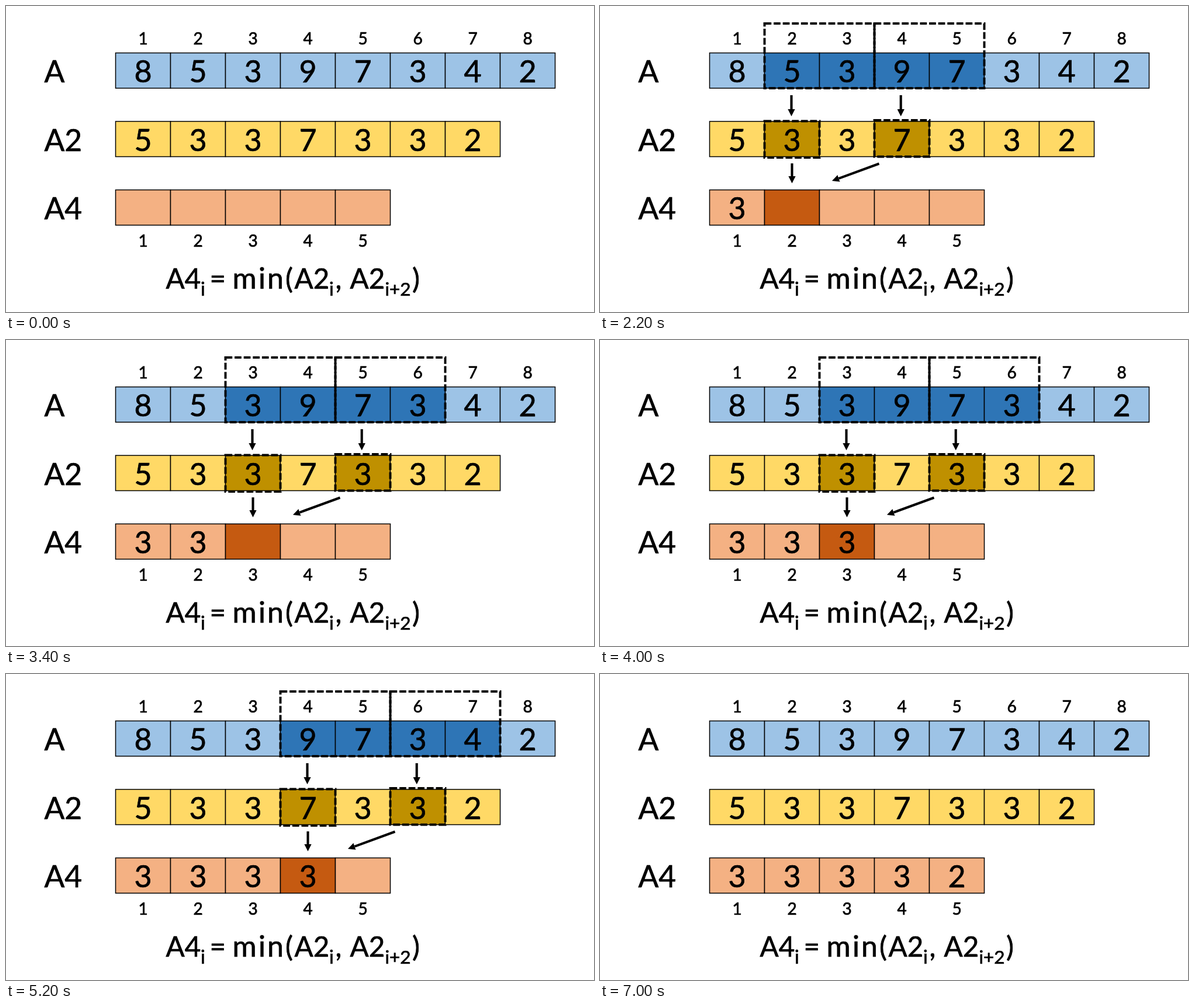
Animation, 1006 px wide and 525 px high, one loop 8 s. Source, as an HTML page:

```html
<!DOCTYPE html>
<html lang="en">
<head>
<meta charset="utf-8">
<title>Sparse table of range minima</title>
<style>
  html, body { margin: 0; width: 100%; height: 100%; overflow: hidden; background: #fff; }
  svg { display: block; width: 1006px; height: 525px; font-family: Lato, "Open Sans", sans-serif; }
  text { stroke: #000; stroke-width: 0.7; }
  .cell { stroke: #000; stroke-width: 1.5; }
  .dash { fill: none; stroke: #000; stroke-width: 3.9; stroke-dasharray: 11.7 3.9; }
  .arrow { stroke: #000; stroke-width: 4.1; marker-end: url(#head); }
</style>
</head>
<body>
<svg viewBox="0 0 1006 525">
  <defs>
    <marker id="head" viewBox="0 0 3 3" refX="0" refY="1.5" markerWidth="3" markerHeight="3" orient="auto">
      <path d="M0 0L3 1.5L0 3z"/>
    </marker>
  </defs>
  <g id="scene"></g>
</svg>
<script>
const LEFT = 187.5, CELL = 94, HEIGHT = 60.5;
const ROWS = [
  { name: 'A', y: 80.5, values: [8, 5, 3, 9, 7, 3, 4, 2], light: '#9dc3e6', dark: '#2e75b6', lit: [0, 1, 2, 3] },
  { name: 'A2', y: 198, values: [5, 3, 3, 7, 3, 3, 2], light: '#ffd966', dark: '#bf9000', lit: [0, 2] },
  { name: 'A4', y: 315.5, values: [3, 3, 3, 3, 2], light: '#f4b183', dark: '#c55a11', lit: [0] }
];
// Text, x, baseline, size
const FORMULA = [
  ['A4', 273.5, 485, 47.5], ['i', 333, 497, 32], ['=', 348.5, 485, 47.5],
  ['m', 387.5, 485, 50], ['i', 432, 485, 50], ['n', 447, 485, 50], ['(', 478, 485, 48.5],
  ['A2', 493.5, 485, 47.5], ['i', 553, 497, 32], [',', 563.5, 485, 47.5],
  ['A2', 588.5, 485, 47.5], ['i+2', 648.5, 497, 31.5], [')', 695, 485, 48.5]
];
const scene = document.getElementById('scene');

const text = (s, x, y, size, anchor = 'start') =>
  `<text x="${x}" y="${y}" font-size="${size}" text-anchor="${anchor}">${s}</text>`;
const rect = (x, y, w, h, attrs) =>
  `<rect x="${x}" y="${y}" width="${w}" height="${h}" ${attrs}/>`;
const arrow = (x1, y1, x2, y2) =>
  `<line class="arrow" x1="${x1}" y1="${y1}" x2="${x2}" y2="${y2}"/>`;
const dashed = (x, y, w, h) => rect(x, y, w, h, 'class="dash"');
const middle = i => LEFT + CELL * (i + 0.5);

function drawRow(row, step, filled) {
  const cells = row.values.map((v, i) => {
    const lit = step >= 0 && row.lit.includes(i - step);
    const box = rect(LEFT + CELL * i, row.y, CELL, HEIGHT, `class="cell" fill="${lit ? row.dark : row.light}"`);
    return box + (i < filled ? text(v, middle(i), row.y + 50.8, 52, 'middle') : '');
  });
  return text(row.name, 65.5, row.y + 50.8, 51.5) + cells.join('');
}

function drawLinks(step) {
  const x = LEFT + CELL * step;
  return dashed(x, 30, 2 * CELL, 111) + dashed(x + 2 * CELL, 30, 2 * CELL, 111) +
    dashed(x, 197.5, CELL, 62.5) + dashed(x + 2 * CELL, 196, CELL, 62.5) +
    arrow(x + 46, 153, x + 46, 177) + arrow(x + 233.2, 153, x + 233.2, 177) +
    arrow(x + 47, 270, x + 47, 292) + arrow(x + 196, 270.5, x + 127, 295.8);
}

function draw(step, filled) {
  const indices = (n, y) =>
    Array.from({ length: n }, (_, i) => text(i + 1, middle(i), y, 28, 'middle')).join('');
  scene.innerHTML =
    ROWS.map((row, i) => drawRow(row, step, i < 2 ? 8 : filled)).join('') +
    indices(8, 66) + indices(5, 412.5) +
    FORMULA.map(part => text(...part)).join('') +
    (step < 0 ? '' : drawLinks(step));
}

let shown;
function tick() {
  const t = performance.now() % 8000;
  const step = t < 1000 || t >= 7000 ? -1 : Math.floor((t - 1000) / 1200);
  const filled = Math.max(0, Math.floor((t - 400) / 1200));
  const state = step + ':' + filled;
  if (state !== shown) draw(step, filled);
  shown = state;
  requestAnimationFrame(tick);
}
tick();
</script>
</body>
</html>
```
